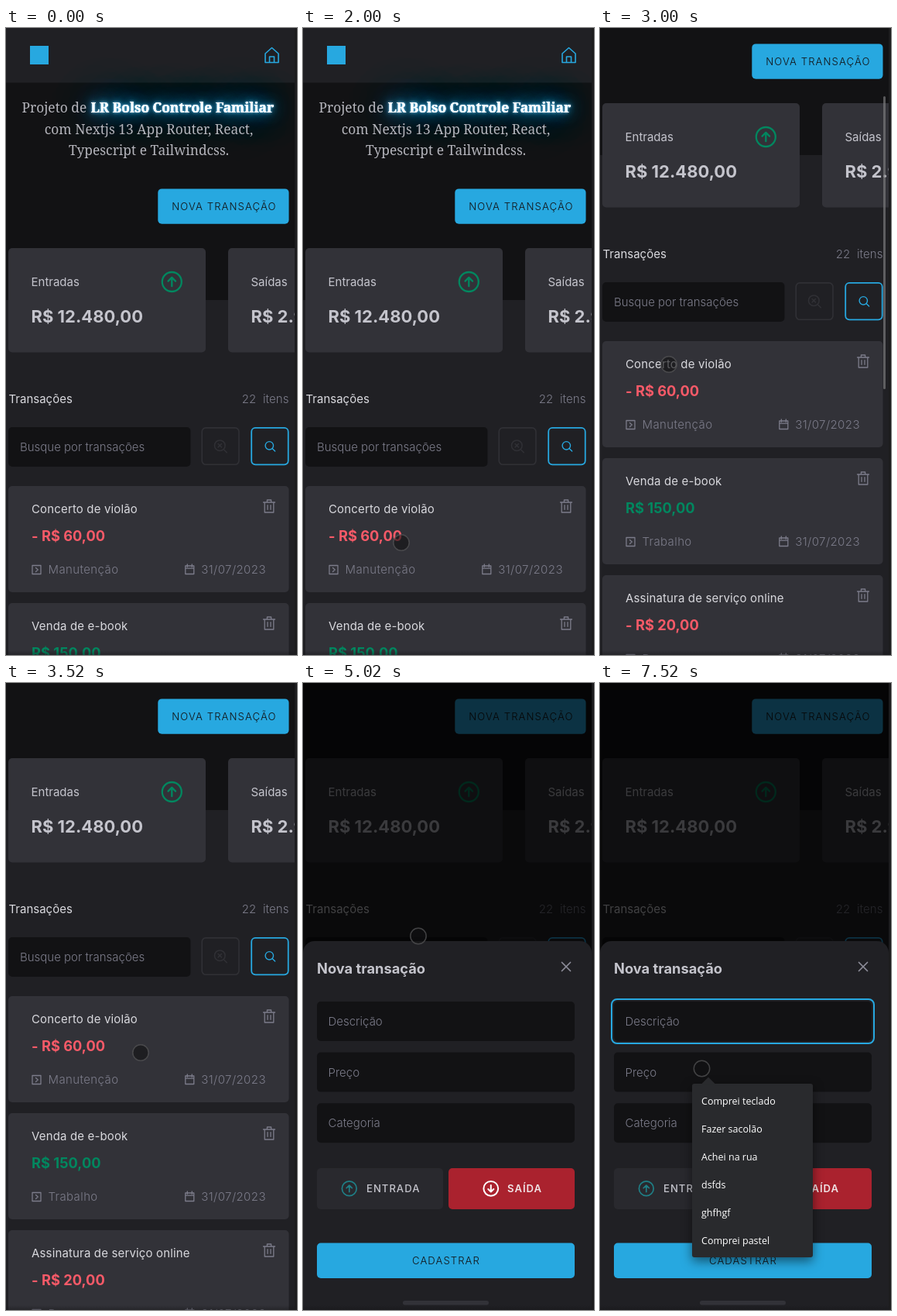
These frames come from a looping animation (376x809 px, 8 s). An HTML page with a canvas:

```html
<!DOCTYPE html>
<html lang="pt-BR">
<head>
<meta charset="utf-8">
<title>Controle financeiro</title>
<style>
html, body { margin: 0; width: 100%; height: 100%; overflow: hidden; background: #1c1c1e; }
canvas { display: block; width: 376px; height: 809px; }
</style>
</head>
<body>
<canvas id="stage"></canvas>
<script>
const W = 376, H = 809, VIEW = 373, LOOP = 8000;
const canvas = document.getElementById('stage');
const ctx = canvas.getContext('2d');
const dpr = window.devicePixelRatio || 1;
canvas.width = W * dpr;
canvas.height = H * dpr;

const C = {
  bg: '#202024', dark: '#121214', card: '#323238', button: '#29292e',
  blue: '#27a8e0', green: '#00875f', red: '#f75a68', danger: '#aa222e',
  text: '#c4c4cc', title: '#d9d9de', muted: '#7c7c8a', edge: '#1c1c1e'
};
const inter = (weight, size) => `${weight} ${size}px Inter, sans-serif`;
const serif = weight => `${weight} 17.35px "Noto Serif", serif`;
const BODY = inter(400, 15), LIGHT = inter(300, 15), PRICE = inter(700, 18.3);

const items = [
  { name: 'Concerto de violão', price: '- R$ 60,00', kind: 'Manutenção' },
  { name: 'Venda de e-book', price: 'R$ 150,00', kind: 'Trabalho' },
  { name: 'Assinatura de serviço online', price: '- R$ 20,00', kind: 'Despesa' }
];
const hints = ['Comprei teclado', 'Fazer sacolão', 'Achei na rua', 'dsfds', 'ghfhgf', 'Comprei pastel'];

// The recording is a series of held states; each one changes only what it names.
const steps = [
  { at: 0, scroll: 0 },
  { at: 990, x: 118, y: 657 },
  { at: 1500, x: 126, y: 656 },
  { at: 2000, x: 127, y: 664 },
  { at: 2500, x: 156, y: 577, scroll: 83, thumb: true, press: true },
  { at: 3000, x: 89, y: 434, scroll: 187, press: false },
  { at: 3520, x: 174, y: 477, thumb: false },
  { at: 4010, x: 302, y: 62 },
  { at: 4530, x: 298, y: 45.5 },
  { at: 5020, x: 149, y: 326.5, modal: true },
  { at: 5520, x: 138, y: 443 },
  { at: 6040, focus: true, caret: true },
  { at: 6530, caret: false },
  { at: 7030, caret: true },
  { at: 7520, x: 131.5, y: 497.5, caret: false }
];
const stateAt = t => Object.assign({}, ...steps.filter(s => s.at <= t));

function text(str, x, y, font, color, { align = 'left', spacing = 0 } = {}) {
  ctx.font = font;
  ctx.fillStyle = color;
  ctx.textAlign = align;
  ctx.letterSpacing = spacing + 'px';
  ctx.fillText(str, x, y);
}

function rect(x, y, w, h, color) {
  ctx.fillStyle = color;
  ctx.fillRect(x, y, w, h);
}

function box(x, y, w, h, r, fill, stroke, line = 1) {
  ctx.beginPath();
  ctx.roundRect(x, y, w, h, r);
  if (fill) { ctx.fillStyle = fill; ctx.fill(); }
  if (stroke) { ctx.strokeStyle = stroke; ctx.lineWidth = line; ctx.stroke(); }
}

function icon(d, x, y, color, line = 1.3) {
  ctx.save();
  ctx.translate(x, y);
  ctx.strokeStyle = color;
  ctx.lineWidth = line;
  ctx.lineCap = ctx.lineJoin = 'round';
  ctx.stroke(new Path2D(d));
  ctx.restore();
}

function ring(x, y, r, color, line, fill) {
  ctx.beginPath();
  ctx.arc(x, y, r, 0, Math.PI * 2);
  if (fill) { ctx.fillStyle = fill; ctx.fill(); }
  ctx.strokeStyle = color;
  ctx.lineWidth = line;
  ctx.stroke();
}

// Circled arrow; dir is 1 for up and -1 for down.
function arrow(x, y, r, dir, color, line) {
  ring(x, y, r, color, line);
  const a = r * 0.45 * dir, w = r * 0.38;
  icon(`M0 ${a}V${-a}M${-w} ${w * dir - a}L0 ${-a}L${w} ${w * dir - a}`, x, y, color, line);
}

function glass(x, y, color) {
  ring(x, y, 5.2, color, 1.4);
  icon('M4 4L7.3 7.3', x, y, color, 1.4);
}

function glow(str, x, y) {
  for (const [color, blur] of [['#27a8e0', 70], ['#27a8e0', 40], ['#27a8e0', 22], ['#27a8e0', 9], ['#9fdcff', 3]]) {
    ctx.shadowColor = color;
    ctx.shadowBlur = blur * dpr;
    text(str, x, y, serif(700), '#fff');
  }
  ctx.shadowColor = 'transparent';
  ctx.shadowBlur = 0;
}

function hero() {
  rect(0, 70, VIEW, 281, C.dark);
  rect(0, 0, VIEW, 70.5, C.bg);
  box(31, 23, 24, 24, 0, C.blue);
  icon('M-8.5 -2L0 -9.5L8.5 -2V9.5H-8.5ZM-3 9.5V2H3V9.5', 343.5, 35, C.blue, 1.6);

  glow('LR Bolso Controle Familiar', 109.5, 109);
  text('Projeto de', 20.5, 109, serif(400), '#b4b4bb');
  const mid = { align: 'center' };
  text('com Nextjs 13 App Router, React,', 184.5, 136.5, serif(400), '#b4b4bb', mid);
  text('Typescript e Tailwindcss.', 184.5, 164, serif(400), '#b4b4bb', mid);

  box(196.3, 207.4, 169.2, 45.3, 5, C.blue);
  text('NOVA TRANSAÇÃO', 214.3, 235, inter(300, 13.125), C.dark, { spacing: 1.1 });
}

function summary(x, label, value) {
  box(x, 284, 255, 134.5, 5, C.card);
  text(label, x + 29.5, 333, BODY, C.text);
  text(value, x + 29.5, 380, inter(700, 22), C.text);
}

function search() {
  text('Transações', 3.5, 484, BODY, C.title);
  text('22  itens', 365.5, 484, LIGHT, C.muted, { align: 'right', spacing: 0.1 });
  box(3, 515, 235.5, 51, 5, C.dark);
  text('Busque por transações', 18, 546, LIGHT, C.muted);

  const off = '#303035';
  box(253.2, 515.9, 47.8, 47.4, 5, null, off, 1.6);
  ring(276.3, 538.7, 6.8, off, 1.5);
  icon('M-2.2 -2.2L2.2 2.2M2.2 -2.2L-2.2 2.2M5 5L9 9', 276.3, 538.7, off, 1.5);
  box(317.2, 515.9, 47.5, 47.4, 5, null, C.blue, 1.8);
  glass(340.3, 538.8, C.blue);
}

function item({ name, price, kind }, y) {
  const wide = { spacing: 0.4 };
  box(3, y, 362.5, 137, 5, C.card);
  text(name, 33, y + 35, BODY, C.title, { spacing: 0.15 });
  text(price, 33, y + 71, PRICE, price[0] === '-' ? C.red : C.green);
  icon('M-7.5 -5H7.5M-2.6 -5V-8H2.6V-5M-5.8 -5V8H5.8V-5M-2 -1.3V4.3M2 -1.3V4.3', 340, y + 26, C.muted);
  icon('M-5.5 -5.5H5.5V5.5H-5.5ZM-1 -2.5L1.8 0L-1 2.5', 39.5, y + 108, C.muted);
  text(kind, 54.5, y + 113, LIGHT, C.muted, wide);
  icon('M-5.5 -4.5H5.5V6H-5.5ZM-5.5 -1.3H5.5M-3 -6.5V-3.2M3 -6.5V-3.2', 237.3, y + 107.5, C.muted);
  text('31/07/2023', 252.3, y + 113, LIGHT, C.muted, wide);
}

function page(scroll) {
  rect(0, 0, VIEW, H, C.bg);
  ctx.save();
  ctx.translate(0, -scroll);
  hero();
  summary(3, 'Entradas', 'R$ 12.480,00');
  arrow(214.3, 327.5, 12.5, 1, C.green, 2.3);
  summary(287, 'Saídas', 'R$ 2.980,00');
  search();
  items.forEach((it, i) => item(it, 591 + 151 * i));
  ctx.restore();
}

function modal(s) {
  rect(0, 0, VIEW, H, 'rgba(0,0,0,0.7)');
  box(0, 333, VIEW, 490, 15, C.bg);
  text('Nova transação', 18, 375, PRICE, C.text);
  icon('M-5.5 -5.5L5.5 5.5M5.5 -5.5L-5.5 5.5', 340, 366, '#8d8d99', 1.7);

  ['Descrição', 'Preço', 'Categoria'].forEach((label, i) => {
    const y = 411 + 65.6 * i;
    box(18, y, 333, 51, 5, C.dark);
    text(label, 32.5, y + 31, LIGHT, C.muted);
  });
  if (s.focus) box(15, 408, 339, 57, 7, null, C.blue, 2);
  if (s.caret) rect(32.5, 427, 1.2, 19, '#e1e1e6');

  box(18, 626, 163, 53, 5, C.button);
  arrow(59.8, 652.3, 9.4, 1, '#1f7f86', 1.7);
  text('ENTRADA', 82, 657, inter(500, 13.125), C.text, { spacing: 1 });
  box(188, 626, 163, 53, 5, C.danger);
  arrow(242.8, 652.3, 9.4, -1, '#fff', 2);
  text('SAÍDA', 264, 657, inter(600, 13.125), '#f0e4e6', { spacing: 1 });

  box(18, 722.5, 333, 45.5, 5, C.blue);
  text('CADASTRAR', 141, 750, inter(300, 13.125), C.dark, { spacing: 1.1 });
  box(129, 797, 111, 5.5, 2.7, C.card);
  if (s.focus) dropdown();
}

function dropdown() {
  const fill = '#292a2d';
  ctx.save();
  ctx.shadowColor = 'rgba(0,0,0,0.5)';
  ctx.shadowBlur = 14 * dpr;
  ctx.shadowOffsetY = 5 * dpr;
  box(119, 517, 156, 224, 3, fill);
  ctx.restore();
  ctx.fillStyle = fill;
  ctx.fill(new Path2D('M131 517.5L140 508.5L149 517.5Z'));
  hints.forEach((hint, i) => {
    text(hint, 131, 544 + 36 * i, '400 12.5px "Open Sans", sans-serif', '#fff');
  });
}

function cursor({ x, y, press }) {
  if (x === undefined) return;
  if (press) ring(x, y, 11.3, 'rgba(170,156,30,0.8)', 1.4, 'rgba(142,130,18,0.92)');
  else ring(x, y, 10.2, 'rgba(84,84,86,0.75)', 1.5, 'rgba(18,18,20,0.62)');
}

function draw(t) {
  const s = stateAt(t);
  ctx.setTransform(dpr, 0, 0, dpr, 0, 0);
  ctx.save();
  ctx.beginPath();
  ctx.rect(0, 0, VIEW, H);
  ctx.clip();
  page(s.scroll);
  if (s.thumb) box(366, 2 + s.scroll * 0.46, 3, 378, 1.5, 'rgba(128,128,130,0.65)');
  if (s.modal) modal(s);
  const shade = ctx.createLinearGradient(0, 803, 0, H);
  shade.addColorStop(0, 'rgba(18,18,20,0)');
  shade.addColorStop(1, 'rgba(18,18,20,0.4)');
  rect(0, 803, VIEW, 6, shade);
  cursor(s);
  ctx.restore();
  rect(VIEW, 0, W - VIEW, H, C.edge);
}

const start = performance.now();
function tick() {
  draw((performance.now() - start) % LOOP);
  requestAnimationFrame(tick);
}
tick();
</script>
</body>
</html>
```
